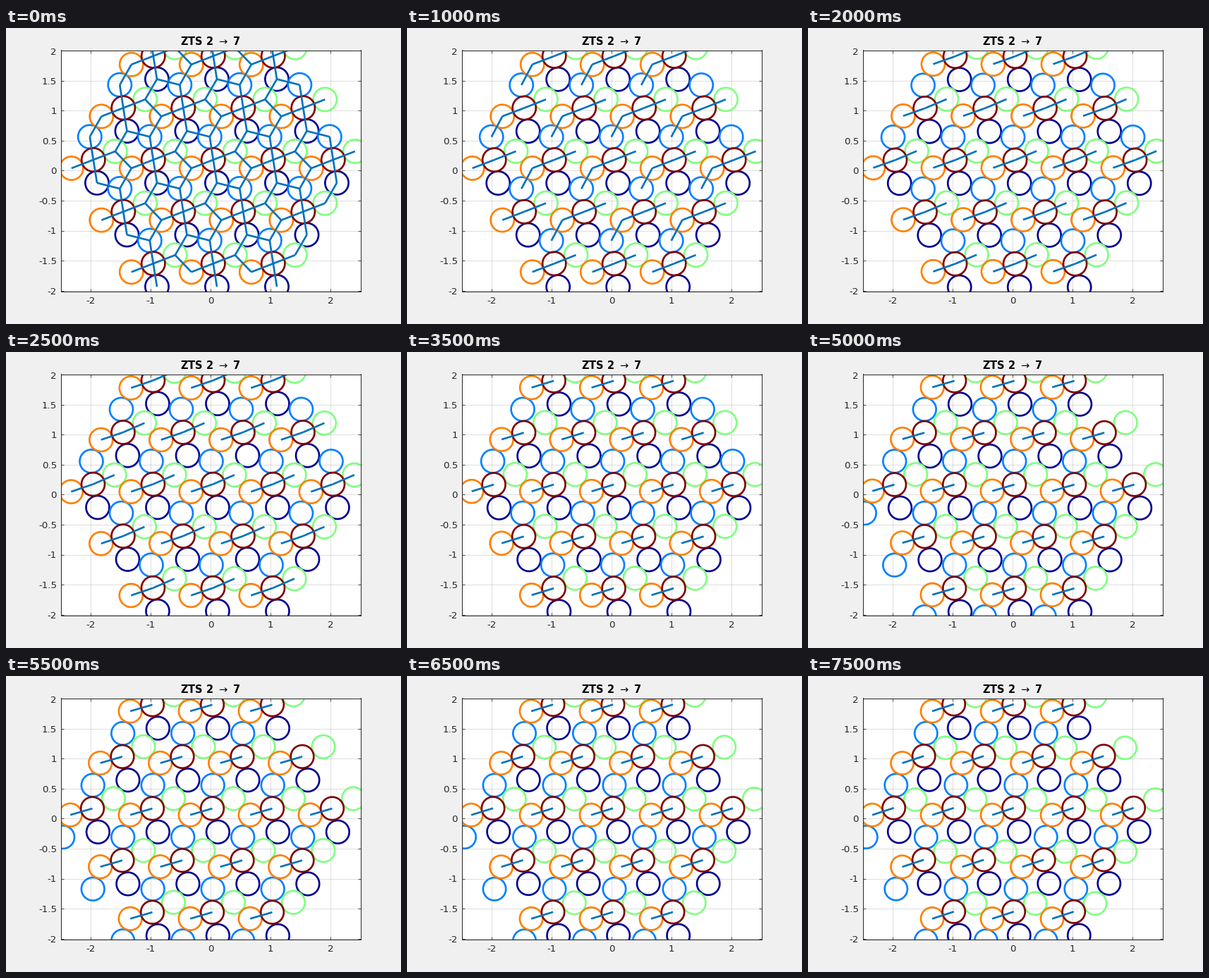
Animation, 560 px wide and 420 px high, one loop 8 s. Source, as a matplotlib script:

```python
import numpy as np
import matplotlib.pyplot as plt
from matplotlib.animation import FuncAnimation
from matplotlib.collections import LineCollection

W, H, DPI = 560, 420, 100
PX = 72 / DPI                      # points per pixel
UNIT, CX, CY = 85, 290, 202.5      # pixels per data unit, position of (0, 0)
FRAMES, INTERVAL = 16, 500
WRAP = 9                           # step at which the blue disks change cell

NAVY, BLUE, GREEN, ORANGE, RED = range(5)
COLORS = ["#00008f", "#0080ff", "#80ff80", "#ff8000", "#800000"]

# Disk centres of the middle cell in pixels, at a few steps of the path
STEPS = [0, 2, 5, 8, 11, 13, 15]
PATHS = {
    NAVY: ([299.0, 299.2, 300.0, 300.8, 300.4, 299.7, 299.3],
           [219.8, 220.0, 220.5, 221.3, 221.3, 221.0, 220.8]),
    BLUE: ([288.8, 289.7, 291.0, 291.9, 293.2, 294.0, 294.8],
           [154.3, 154.6, 155.0, 155.0, 155.0, 155.0, 154.9]),
    GREEN: ([324.8, 324.5, 323.9, 323.0, 322.4, 322.3, 322.1],
            [175.0, 174.9, 174.4, 173.5, 174.0, 174.6, 175.5]),
    ORANGE: ([262.8, 262.7, 262.3, 261.3, 261.2, 261.1, 261.1],
             [199.0, 198.9, 198.2, 197.5, 197.1, 197.2, 197.2]),
    RED: ([293.8, 293.7, 293.5, 292.9, 292.5, 292.0, 291.7],
          [187.0, 187.1, 187.6, 188.3, 188.0, 187.7, 187.2]),
}

# Contacts: disk, other disk, cell of the other disk, number of steps it lasts
CONTACTS = [
    (ORANGE, RED, (0, 0), FRAMES),
    (RED, GREEN, (0, 0), 7),
    (BLUE, ORANGE, (0, 1), 4),
    (RED, BLUE, (0, 0), 1),
    (RED, NAVY, (0, 0), 1),
    (NAVY, BLUE, (1, -1), 1),
    (ORANGE, GREEN, (-1, 0), 1),
    (NAVY, GREEN, (0, -1), 1),
]

BASIS = np.array([[1, 0], [0.5, np.sqrt(3) / 2]])
CELLS = [(m, n) for n in range(-2, 3) for m in range(-2, 3) if abs(m + n) <= 2]
SHIFTS = np.array(CELLS) @ BASIS
angle = np.linspace(0, 2 * np.pi, 101)
RING = np.column_stack([np.cos(angle), np.sin(angle)])


def centre(disk, step):
    x, y = (np.interp(step, STEPS, p) for p in PATHS[disk])
    return np.array([(x - CX) / UNIT, (CY - y) / UNIT])


def rings(pos, radius):
    return [pos + s + radius * RING for s in SHIFTS]


def bonds(pos, step):
    lines = []
    for a, b, (dm, dn), life in CONTACTS:
        if step >= life:
            continue
        for m, n in CELLS:
            other = (m + dm, n + dn)
            if other in CELLS:
                lines.append([pos[a] + np.array((m, n)) @ BASIS,
                              pos[b] + np.array(other) @ BASIS])
    return lines


fig = plt.figure(figsize=(W / DPI, H / DPI), dpi=DPI, facecolor="#f0f0f0")
left, right, top, bottom = 77.5, 502.5, 31.5, 373.5
ax = fig.add_axes([left / W, 1 - bottom / H, (right - left) / W, (bottom - top) / H])
ax.set_xlim((left - CX) / UNIT, (right - CX) / UNIT)
ax.set_ylim((CY - bottom) / UNIT, (CY - top) / UNIT)

plt.rcParams["font.family"] = "DejaVu Sans"
INK = "#262626"
xt, yt = np.arange(-2, 3), np.arange(-2, 2.1, 0.5)
ax.set_xticks(xt, [f"{v:g}" for v in xt])
ax.set_yticks(yt, [f"{v:g}" for v in yt])
ax.tick_params(direction="in", top=True, right=True, length=4.25 * PX,
               width=0.8 * PX, color=INK, labelcolor=INK, labelsize=13.33 * PX)
ax.tick_params(axis="x", pad=7.5 * PX)
ax.tick_params(axis="y", pad=5.5 * PX)
ax.grid(color=INK, alpha=0.15, linewidth=1 * PX)
ax.set_axisbelow(True)
for spine in ax.spines.values():
    spine.set(color=INK, linewidth=1 * PX)
fig.text(CX / W, 1 - 24 / H, r"ZTS 2 $\rightarrow$ 7", ha="center", va="baseline",
         fontsize=14.67 * PX, fontweight="bold", color="black")

disks = [ax.add_collection(LineCollection([], colors=c, linewidths=2.67 * PX, zorder=2),
                           autolim=False) for c in COLORS]
links = ax.add_collection(LineCollection([], colors="#0072bd", linewidths=2.67 * PX,
                                         zorder=2.2), autolim=False)


def draw(step):
    pos = [centre(d, step) for d in range(5)]
    radius = np.hypot(*(pos[RED] - pos[ORANGE])) / 2
    if step >= WRAP:
        pos[BLUE] = pos[BLUE] - BASIS[1]
    for disk, p in zip(disks, pos):
        disk.set_segments(rings(p, radius))
    links.set_segments(bonds(pos, step))
    return [*disks, links]


anim = FuncAnimation(fig, draw, frames=FRAMES, interval=INTERVAL, repeat=True,
                     repeat_delay=0)
plt.show()
```
